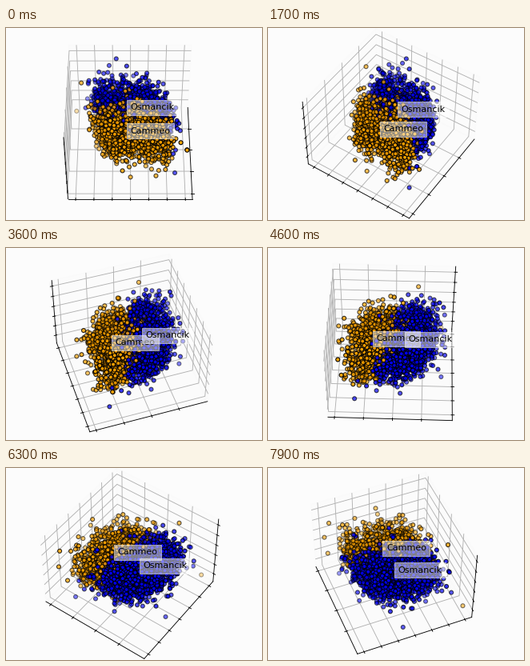
Animation, 320 px wide and 240 px high, one loop 8 s. Source, as a matplotlib script:

```python
import numpy as np
import matplotlib.pyplot as plt
from matplotlib.animation import FuncAnimation

FRAMES, STEP = 80, 2
PAPER = "#fcfcfc"
HALF = np.array([0.5953, 0.5953, 0.4465])
CLASSES = (("Cammeo", "orange", 1630, 0.153),
           ("Osmancik", "blue", 2180, -0.153))

rng = np.random.default_rng(7)


def cloud(n, cx):
    """Leaning slab: y follows x plus a flat spread; a few points lie wide."""
    wide = np.where(rng.random(n) < 0.04, 1.6, 1.0)
    dx = rng.normal(0, 0.115, n) * wide
    flat = 0.56 * (rng.beta(0.85, 0.85, n) - 0.5)
    dy = 0.015 + 0.5 * dx + flat + rng.normal(0, 0.045, n) * wide
    dz = rng.normal(0, 0.118, n) * wide
    return np.clip(np.column_stack([cx + dx, dy, dz]),
                   -0.92 * HALF, 0.92 * HALF)


fig = plt.figure(figsize=(4, 3), dpi=80, facecolor=PAPER)
ax = fig.add_axes([0, 0, 0.95, 1], projection="3d", facecolor=PAPER)

points, colors = [], []
for name, color, count, cx in CLASSES:
    points.append(cloud(count, cx))
    colors += [color] * count
    ax.text(cx, 0, 0, name,
            bbox=dict(alpha=0.5, edgecolor="w", facecolor="w"))
ax.scatter(*np.vstack(points).T, c=colors, edgecolor="k")

ax.set(xlim=(-HALF[0], HALF[0]), ylim=(-HALF[1], HALF[1]),
       zlim=(-HALF[2], HALF[2]))
for axis, first, gap, end in ((ax.xaxis, -0.301, 0.278, HALF[0]),
                              (ax.yaxis, -0.522, 0.175, HALF[1]),
                              (ax.zaxis, -0.330, 0.140, HALF[2])):
    axis.set_ticks(np.arange(first, end, gap), labels=[])
    axis.set_pane_color((0.975, 0.975, 0.975, 0.3))


def update(i):
    # The tiny offset settles which side panes show when seen edge-on.
    ax.view_init(elev=48, azim=STEP * i + 1e-6)
    return []


anim = FuncAnimation(fig, update, frames=FRAMES, interval=100,
                     repeat=True, repeat_delay=0, blit=False)
plt.show()
```
